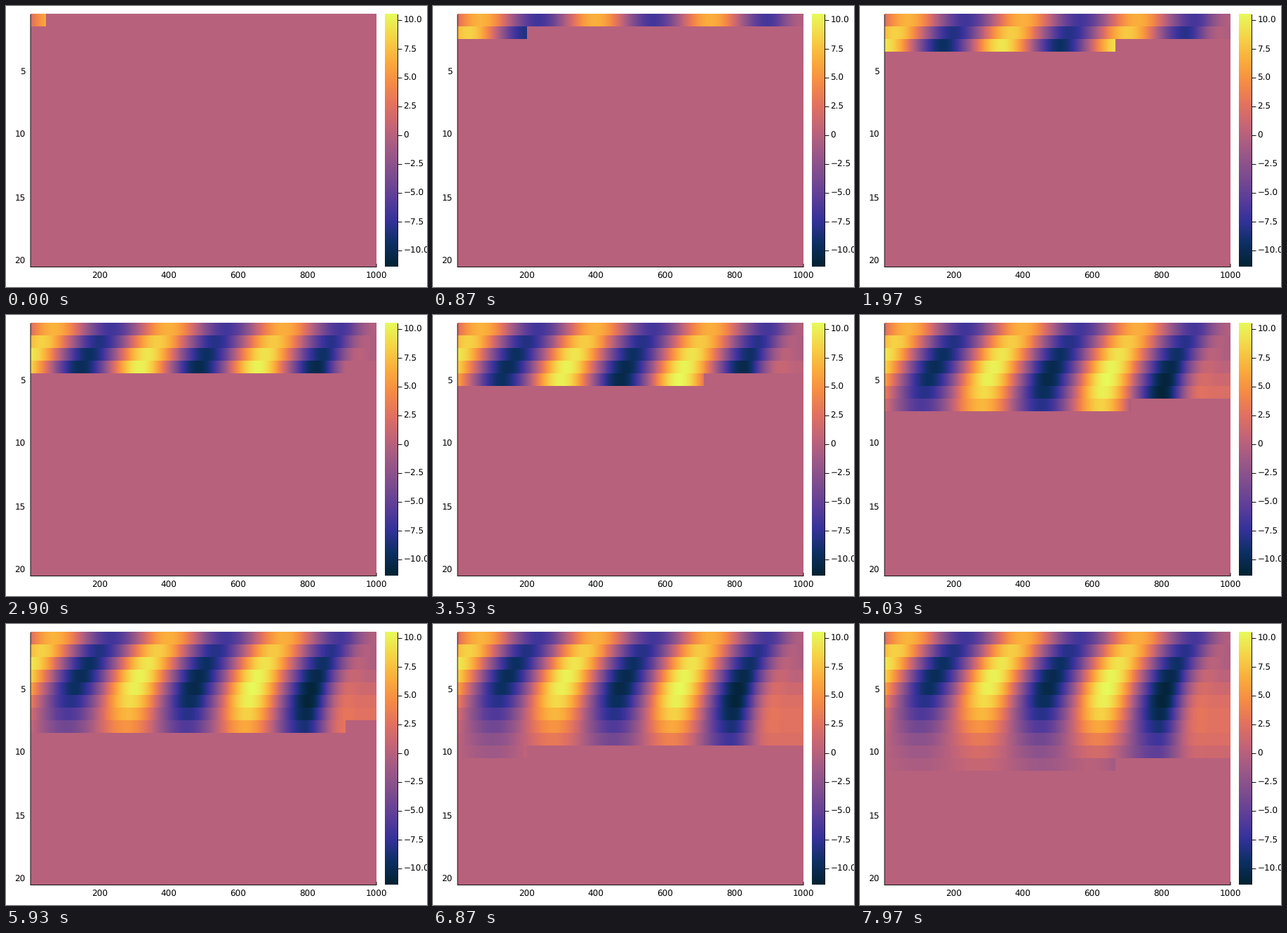
These frames come from a looping animation (600 by 400 pixels, 8 s). A matplotlib script:

```python
import numpy as np
import matplotlib.pyplot as plt
from matplotlib.animation import FuncAnimation
from matplotlib.colors import LinearSegmentedColormap
from matplotlib.patches import Rectangle

ROWS, COLS = 20, 1000
FRAMES = 240
CELLS_PER_FRAME = ROWS * COLS / 450
LEFT, RIGHT, TOP, BOTTOM = 35, 528, 11, 371
VMIN, VMAX = -11.38, 10.52
PERIOD = 332
INK = "#111111"

plt.rcParams["text.hinting"] = "none"
THERMAL = LinearSegmentedColormap.from_list("thermal", [
    "#032333", "#0d3064", "#35329b", "#5d3e99", "#7e4d8f", "#9e5987",
    "#c16479", "#e17161", "#f68b45", "#fbad3c", "#f6d346", "#e7fa5a"], N=256)


def wave(row, x):
    """Cosine that drifts left down the rows, swells around row 5 and fades."""
    u = x / COLS
    drift = 145 * np.tanh((row - 1) / 4) * (1 - 0.3 * u)
    offset = row - (3.8 + 2.2 * u)
    width = np.where(offset < 0, 4.8 + 2 * u, 4.3)
    swell = (9.7 + 1.5 * u) * np.exp(-(offset / width) ** 2)
    sag = -2.5 * (row / 11) ** 3 * np.exp(-((u - 0.72) / 0.17) ** 2)
    value = swell * np.cos(2 * np.pi * (x - 67 + drift) / PERIOD) + sag

    # Past the last trough the wave settles to a level that varies by row.
    edge = 0.8 - 1.9 * np.cos(2 * np.pi * (row - 1.5) / 12)
    t = np.clip((x - 897 + drift) / 145, 0, 1)
    settle = t * t * (3 - 2 * t)
    return value + (edge - value) * settle


rows, cols = np.mgrid[1:ROWS + 1, 0:COLS]
field = wave(rows, cols + 0.5)

fig = plt.figure(figsize=(6, 4), dpi=100, facecolor="white")
ax = fig.add_axes([0, 0, 1, 1])


def bar(x, y, width, height):
    ax.add_patch(Rectangle((x, y), width, height, fc=INK, lw=0,
                           snap=False, zorder=3))


def label(x, y, text, ha):
    ax.text(x, y, text, ha=ha, va="center", color="black",
            family="DejaVu Sans", fontsize=12 * 0.72)


style = dict(cmap=THERMAL, vmin=VMIN, vmax=VMAX, aspect="auto",
             interpolation="nearest")
heat = ax.imshow(np.zeros_like(field), extent=(LEFT, RIGHT, BOTTOM, TOP), **style)
ax.imshow(np.linspace(VMAX, VMIN, 360)[:, None],
          extent=(540, 558, BOTTOM, TOP), **style)

bar(34.5, 12, 1, 360)
bar(35, 371, 493, 1)
bar(527.5, 367, 1, 5)
bar(558, 12, 1, 359)

for n in range(5, ROWS + 1, 5):
    label(27.5, 12.8 + (n - 0.5) * (BOTTOM - TOP) / ROWS, str(n), "right")
for n in range(200, COLS + 1, 200):
    label(LEFT + (n - 0.5) * (RIGHT - LEFT) / COLS, 384.2, str(n), "center")
for value in np.arange(-10, 10.1, 2.5):
    y = 184.3 - 16.4 * value
    bar(558, round(y - 0.5), 6.5, 1)
    text = f"{value:.1f}".replace("-", "\u2212") if value else "0"
    label(566.5, y + 0.4, text, "left")

ax.set_xlim(0, 600)
ax.set_ylim(400, 0)
ax.axis("off")


def update(frame):
    filled = round(CELLS_PER_FRAME * (frame + 1))
    order = np.arange(ROWS * COLS).reshape(ROWS, COLS)
    heat.set_data(np.where(order < filled, field, 0))
    return [heat]


anim = FuncAnimation(fig, update, frames=FRAMES, interval=8000 / FRAMES,
                     repeat=True, repeat_delay=0, blit=False)
plt.show()
```
